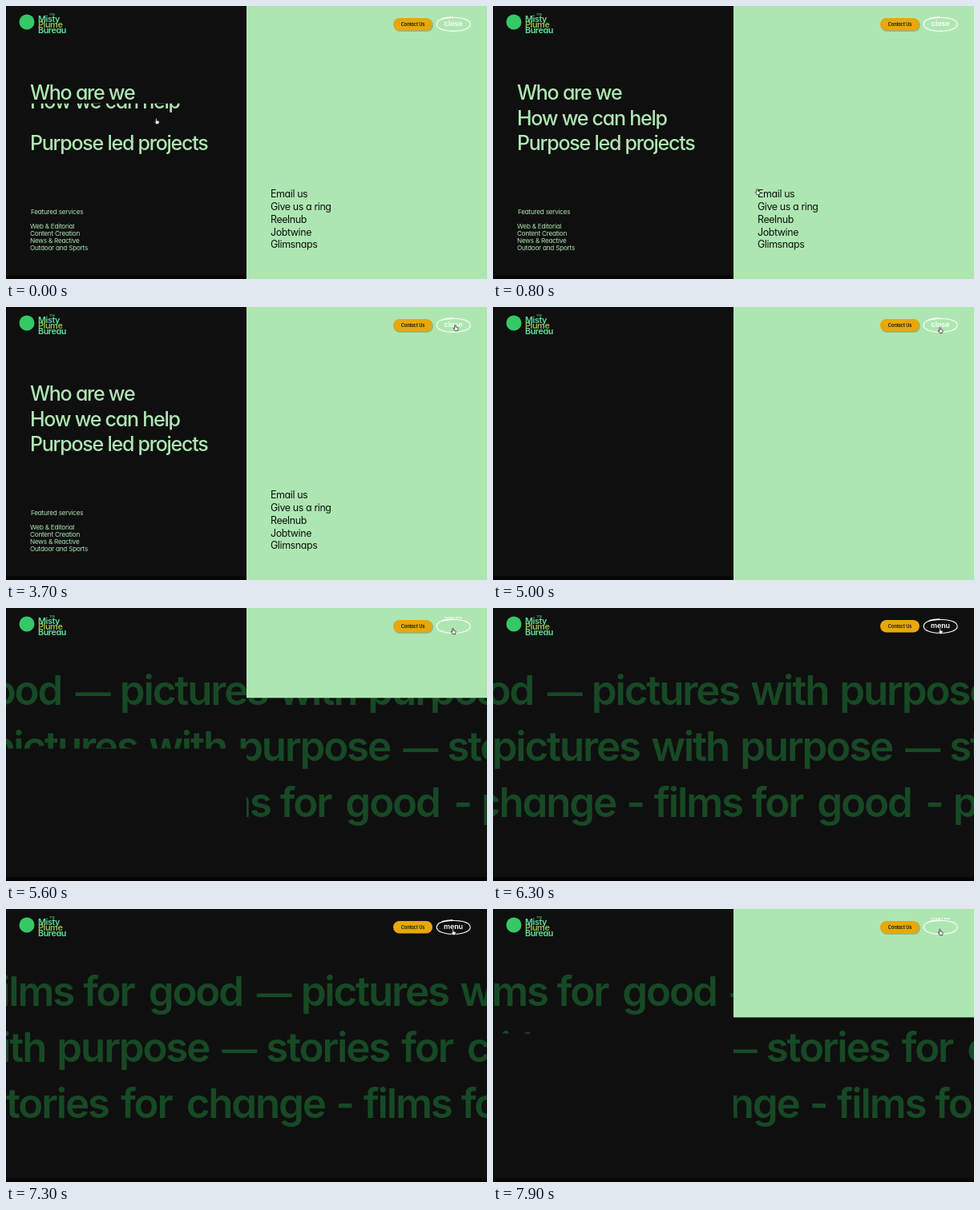
Animation, 600 px wide and 341 px high, one loop 8000 ms. Source, as an HTML page:

```html
<!DOCTYPE html>
<html lang="en">
<head>
<meta charset="utf-8">
<title>Studio menu</title>
<style>
  html, body { margin: 0; width: 100%; height: 100%; overflow: hidden; background: #0f0f0f; }
  #stage { display: block; width: 100vw; height: 100vh; }
  text {
    font-family: Inter, Lato, sans-serif;
    font-feature-settings: "cv11" 1;
    letter-spacing: -.03em;
    white-space: pre;
  }
  .marquee text { font-size: 51px; font-weight: 600; letter-spacing: -.042em; fill: #174925; }
  .marquee .dash { font-size: 44px; }
  .title { font-size: 25px; font-weight: 500; letter-spacing: -.05em; fill: #aee6b2; }
  .service { font-size: 8.2px; fill: #aee6b2; }
  .link { font-size: 12.4px; fill: #0c130d; text-underline-offset: 1px; }
  .brand { font-size: 10.8px; font-weight: 600; letter-spacing: -.04em; }
  .pill { font-size: 5.7px; font-weight: 600; letter-spacing: -.02em; fill: #1a1404; }
  .toggle { font-size: 9px; font-weight: 600; letter-spacing: -.01em; fill: #fff; }
  .status { font: 5.2px Roboto, sans-serif; letter-spacing: 0; fill: #eee; }
</style>
</head>
<body>
<svg id="stage" viewBox="0 0 600 341" preserveAspectRatio="none">
  <rect width="600" height="341" fill="#0f0f0f"/>
  <g id="rows" class="marquee"></g>
  <rect id="darkPanel" width="300" height="341" fill="#0f0f0f"/>
  <rect y="336.5" width="600" height="4.5" fill="#060404"/>
  <rect id="greenPanel" x="300" width="300" fill="#aee6b2"/>
  <g id="lines"></g>

  <circle cx="26" cy="20" r="9.5" fill="#35c866"/>
  <text x="54" y="11.5" font-size="4" fill="#5fe09a">The</text>
  <text class="brand" x="40" y="19.8" fill="#5fe09a">Misty</text>
  <text class="brand" x="40" y="27" fill="#96c24c">Plume</text>
  <text class="brand" x="40" y="34.2" fill="#5fe09a">Bureau</text>

  <rect x="483.5" y="16" width="49.5" height="16" rx="8" fill="#000" opacity=".2"/>
  <rect x="483" y="15" width="49" height="15.6" rx="7.8" fill="#e6a80a"/>
  <text class="pill" x="507.5" y="24.9" text-anchor="middle">Contact Us</text>
  <path d="M544 15.6Q550 14 557 13.8M549 15.2C566 12.8 579.2 16.5 579.2 22.8C579.2 28 570 31.4 558 31.4C546 31.4 537.2 28 537.2 22.8C537.2 18.4 542 16 549 15.2"
        fill="none" stroke="#fff" stroke-width="1.1" stroke-linecap="round"/>
  <svg x="537" y="11" width="42" height="19">
    <text id="oldLabel" class="toggle" x="21" text-anchor="middle"></text>
    <text id="newLabel" class="toggle" x="21" text-anchor="middle"></text>
  </svg>

  <g id="status">
    <rect y="332.5" width="102" height="8.5" fill="#242424"/>
    <text class="status" x="2" y="338.6">mailto:hithere@themistyplumebureau.com</text>
  </g>
  <path id="cursor" d="M-1.2 .8V-3.2Q-.5 -4.4 .2 -3.2V-1L2.6 -.4Q3.3 0 3.1 1L2.5 3.6H-.8L-2.8 .6Q-2.5 -.4 -1.2 .8Z"
        fill="#fff" stroke="#111" stroke-width=".7" stroke-linejoin="round"/>
</svg>
<script>
const LOOP = 8000, HEIGHT = 341;
const PANEL_MS = 1000;
const CLOSE_AT = 5036, CLOSE_LAG = 60;
const OPEN_AT = 7386, OPEN_LAG = 52;
const LABEL_STEP = 24;

const byId = id => document.getElementById(id);
const clamp = v => Math.max(0, Math.min(1, v));
const ease = v => {
  const p = clamp(v);
  return p < .5 ? 4 * p ** 3 : 1 - 4 * (1 - p) ** 3;
};
const phase = (t, start, length) => ease((t - start) / length);

function add(parent, tag, attrs, content = '') {
  const node = document.createElementNS('http://www.w3.org/2000/svg', tag);
  for (const key in attrs) node.setAttribute(key, attrs[key]);
  node.textContent = content;
  parent.append(node);
  return node;
}

// Marquee rows: each word advances by its own step.
const STEP = { stories: 169, for: 81.5, change: 186.5, films: 122, good: 135,
               pictures: 198.5, with: 111, purpose: 206, '—': 55, '-': 34.5 };
const DRIFT = 272, DRIFT_MS = 10000, DRIFT_OFFSET = 3650;

const rows = [
  [121, -1, 'films for good — pictures with purpose — stories'],
  [191, 1, 'pictures with purpose — stories for change'],
  [261, -1, 'stories for change - films for good - pictures']
].map(([y, direction, phrase]) => {
  const group = add(byId('rows'), 'g', {});
  let x = 0;
  for (const word of phrase.split(' ')) {
    add(group, 'text', { x, y, class: word === '—' ? 'dash' : '' }, word);
    x += STEP[word];
  }
  return { group, direction };
});

// A menu line is clipped by its own box, so it can slide out of sight.
function menuLine(style, content, x, baseline, top, height) {
  const box = add(byId('lines'), 'svg', { x, y: top, width: 280, height });
  const text = add(box, 'text', { class: style, y: baseline - top }, content);
  return { text, height };
}

const titles = ['Who are we', 'How we can help', 'Purpose led projects']
  .map((s, i) => menuLine('title', s, 30, 117 + 31.7 * i, 90 + 31.7 * i, 31.7));
const heading = menuLine('service', 'Featured services', 31, 260.3, 252, 11);
const services = ['Web & Editorial', 'Content Creation', 'News & Reactive', 'Outdoor and Sports']
  .map((s, i) => menuLine('service', s, 30, 277.8 + 9.2 * i, 269.5 + 9.2 * i, 11));
const links = ['Email us', 'Give us a ring', 'Reelnub', 'Jobtwine', 'Glimsnaps']
  .map((s, i) => menuLine('link', s, 330, 239.3 + 15.8 * i, 227 + 15.8 * i, 16));
const menuLines = [...titles, heading, ...services, ...links];

const pointerPath = [
  [0, 188, 144], [200, 190, 146], [900, 338, 237], [1900, 356, 236],
  [2600, 358, 236], [3500, 561, 26], [4200, 561, 26], [4700, 558, 29]
];

function pointerAt(t) {
  const next = pointerPath.findIndex(k => k[0] > t);
  if (next < 0) return pointerPath[pointerPath.length - 1].slice(1);
  const [t0, x0, y0] = pointerPath[next - 1], [t1, x1, y1] = pointerPath[next];
  const p = (t - t0) / (t1 - t0), k = p * p * (3 - 2 * p);
  return [x0 + (x1 - x0) * k, y0 + (y1 - y0) * k];
}

function drawPanels(t) {
  const right = 1 - phase(t, CLOSE_AT, PANEL_MS) + phase(t, OPEN_AT + OPEN_LAG, PANEL_MS);
  const left = 1 - phase(t, CLOSE_AT + CLOSE_LAG, PANEL_MS) + phase(t, OPEN_AT, PANEL_MS);
  byId('greenPanel').setAttribute('height', HEIGHT * right);
  byId('darkPanel').setAttribute('y', HEIGHT * (1 - left));
}

function drawMarquee(t) {
  const travelled = DRIFT * ((t + DRIFT_OFFSET) % DRIFT_MS) / DRIFT_MS;
  for (const { group, direction } of rows) {
    const x = direction < 0 ? -travelled : travelled - DRIFT;
    group.setAttribute('transform', `translate(${x} 0)`);
  }
}

function drawMenu(t) {
  const hover = t >= 850 && t < 2700;
  const leaving = phase(t, 4400, 550);
  menuLines.forEach(line => {
    let y = leaving * (line.height + 2);
    if (line === titles[1] && t < 600) {
      y = t < 100 ? -21 - t * .11 : 32 * (1 - clamp((t - 100) / 450)) ** 3;
    }
    if (line === links[0] && hover) y -= 1;
    line.text.setAttribute('transform', `translate(0 ${y})`);
  });
  links[0].text.style.textDecoration = hover ? 'underline' : 'none';
  byId('status').style.display = t >= 850 && t < 2900 ? '' : 'none';
}

function drawLabel(t) {
  const opening = t >= OPEN_AT;
  const rise = LABEL_STEP * phase(t, opening ? 7400 : 5100, PANEL_MS);
  const labels = opening ? ['menu', 'close'] : ['close', 'menu'];
  [byId('oldLabel'), byId('newLabel')].forEach((node, i) => {
    node.textContent = labels[i];
    node.setAttribute('y', 13.7 + LABEL_STEP * i - rise);
  });
}

function draw(t) {
  drawPanels(t);
  drawMarquee(t);
  drawMenu(t);
  drawLabel(t);
  byId('cursor').setAttribute('transform', `translate(${pointerAt(t)})`);
}

const start = performance.now();
function tick() {
  draw((performance.now() - start) % LOOP);
  requestAnimationFrame(tick);
}
tick();
</script>
</body>
</html>
```
